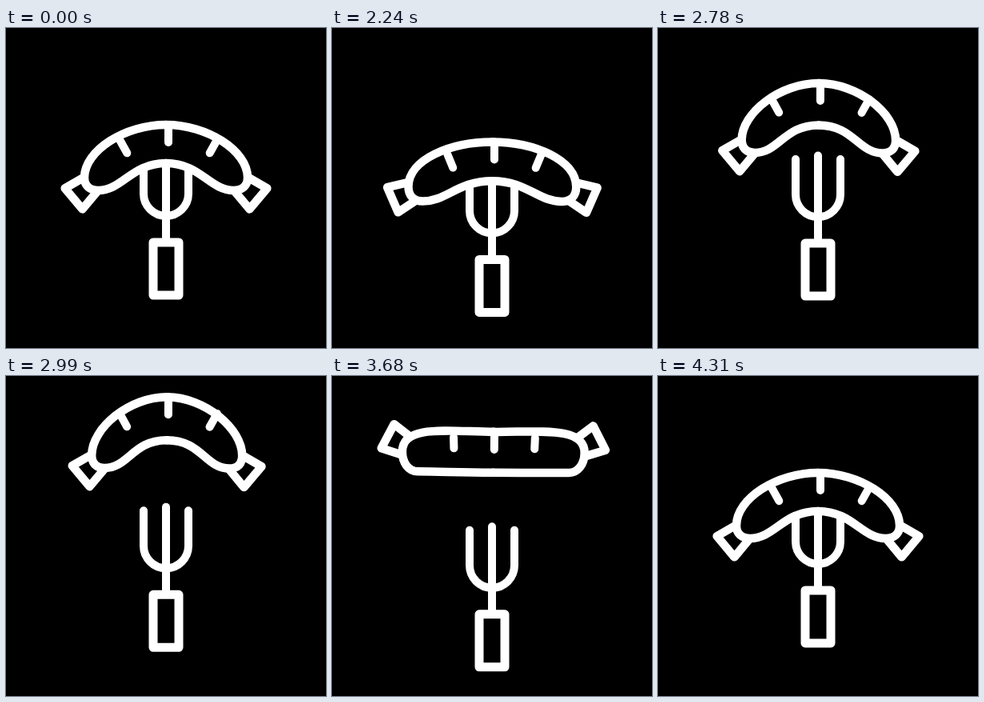
An HTML page with a canvas that plays this animation: 400x400 px, repeating every 4370 ms.

```html
<!DOCTYPE html>
<html lang="en">
<head>
<meta charset="utf-8">
<title>Sausage on a fork</title>
<style>
  html, body { margin: 0; width: 100%; height: 100%; overflow: hidden; background: #000; }
  canvas { display: block; width: 100vmin; height: 100vmin; }
</style>
</head>
<body>
<canvas id="stage" width="400" height="400"></canvas>
<script>
const ctx = document.getElementById('stage').getContext('2d');
const LOOP = 4370;

// Half the sausage, measured from the middle of its top edge; tilt is that of its knotted end.
const REST = { width: 102, side: 66, foot: 82, belly: 48, tilt: 40 };
const CURLED = { width: 94, side: 73, foot: 89, belly: 54, tilt: 40 };
const FLAT = { width: 114, side: 25, foot: 50, belly: 51, tilt: -28 };

const rad = degrees => degrees * Math.PI / 180;
const mix = (a, b, u) => a + (b - a) * u;
const ramp = (t, start, end) => {
  const u = Math.min(1, Math.max(0, (t - start) / (end - start)));
  return (1 - Math.cos(Math.PI * u)) / 2;
};
const pulse = (t, start, peak, end) => ramp(t, start, peak) - ramp(t, peak, end);

// Dip, throw, sink while waiting, rise to catch, settle.
const forkOffset = t => 50 * ramp(t, 2000, 2530) - 49 * ramp(t, 2550, 2740)
  + 29 * ramp(t, 2740, 3730) - 37.5 * ramp(t, 3730, 3870) + 7.5 * ramp(t, 3870, 4340);

function sausageOffset(t, forkY) {
  if (t > 3870) return forkY;
  const climb = Math.max(0, 1 - Math.max(0, t - 2540) / 660);
  const fall = Math.max(0, t - 3250);
  const flight = -105 + 155 * climb ** 2.36 + 2.9e-4 * fall ** 2;
  return t < 2760 ? mix(forkY, flight, ramp(t, 2560, 2760)) : Math.min(forkY, flight);
}

const curlAt = t => ramp(t, 2560, 2900) - ramp(t, 3010, 3670);
const flatAt = t => pulse(t, 3010, 3670, 3850)
  + .25 * pulse(t, 2030, 2270, 2560) + .1 * pulse(t, 3870, 4130, 4320);

function line(x1, y1, x2, y2) {
  ctx.beginPath();
  ctx.moveTo(x1, y1);
  ctx.lineTo(x2, y2);
  ctx.stroke();
}

function drawFork(y) {
  ctx.save();
  ctx.translate(200, y);
  ctx.lineWidth = 10;
  line(0, 158.5, 0, 268);
  ctx.beginPath();
  ctx.moveTo(28, 163);
  ctx.arc(0, 207, 28, 0, Math.PI);
  ctx.lineTo(-28, 163);
  ctx.stroke();
  ctx.lineWidth = 11;
  ctx.fillRect(-16, 268, 32, 66);
  ctx.strokeRect(-16, 268, 32, 66);
  ctx.restore();
}

function halfBody({ width, side, foot, belly }) {
  const heel = .83 * width;
  const path = new Path2D();
  path.moveTo(0, 0);
  path.bezierCurveTo(width / 2, 0, width, side - 34, width, side);
  path.bezierCurveTo(width, (side + foot) / 2 + 2, heel + 11, foot, heel, foot);
  path.bezierCurveTo(heel - 30, foot, 43, belly, 0, belly);
  return path;
}

function drawKnot({ width, side, tilt }) {
  ctx.save();
  ctx.translate(width - 18, side);
  ctx.rotate(rad(tilt));
  ctx.beginPath();
  ctx.moveTo(13, -12);
  ctx.lineTo(41, -17);
  ctx.lineTo(41, 17);
  ctx.lineTo(13, 12);
  ctx.closePath();
  ctx.fill();
  ctx.stroke();
  ctx.restore();
}

function drawSideCut({ side, tilt }) {
  ctx.save();
  ctx.translate(55 + .15 * tilt, .28 * side);
  ctx.rotate(rad(13 + .4 * tilt));
  line(0, 0, 0, 16 + .08 * tilt);
  ctx.restore();
}

function bothSides(draw) {
  for (const side of [-1, 1]) {
    ctx.save();
    ctx.scale(side, 1);
    draw(side);
    ctx.restore();
  }
}

function drawSausage(y, curl, flat) {
  const pose = {};
  for (const key in REST) {
    pose[key] = REST[key] + curl * (CURLED[key] - REST[key]) + flat * (FLAT[key] - REST[key]);
  }
  const body = halfBody(pose);
  const drift = 1.5 * curl + 2 * flat;

  ctx.save();
  ctx.translate(200 + drift, 121 + y);
  ctx.rotate(rad(.25 * curl + .5 * flat));
  ctx.lineWidth = 10.5;
  bothSides(() => drawKnot(pose));
  bothSides(() => ctx.fill(body));
  ctx.fillRect(-2, 0, 4, pose.belly);
  bothSides(() => ctx.stroke(body));
  ctx.lineWidth = 10;
  ctx.translate(3 - drift, 0);
  bothSides(() => drawSideCut(pose));
  line(0, 0, 0, 22);
  ctx.restore();
}

function drawFrame(t) {
  ctx.fillStyle = '#000';
  ctx.fillRect(0, 0, 400, 400);
  ctx.strokeStyle = '#fff';
  ctx.lineCap = ctx.lineJoin = 'round';
  const forkY = forkOffset(t);
  drawFork(forkY);
  drawSausage(sausageOffset(t, forkY), curlAt(t), flatAt(t));
}

const begin = performance.now();
function tick() {
  drawFrame((performance.now() - begin) % LOOP);
  requestAnimationFrame(tick);
}
tick();
</script>
</body>
</html>
```
